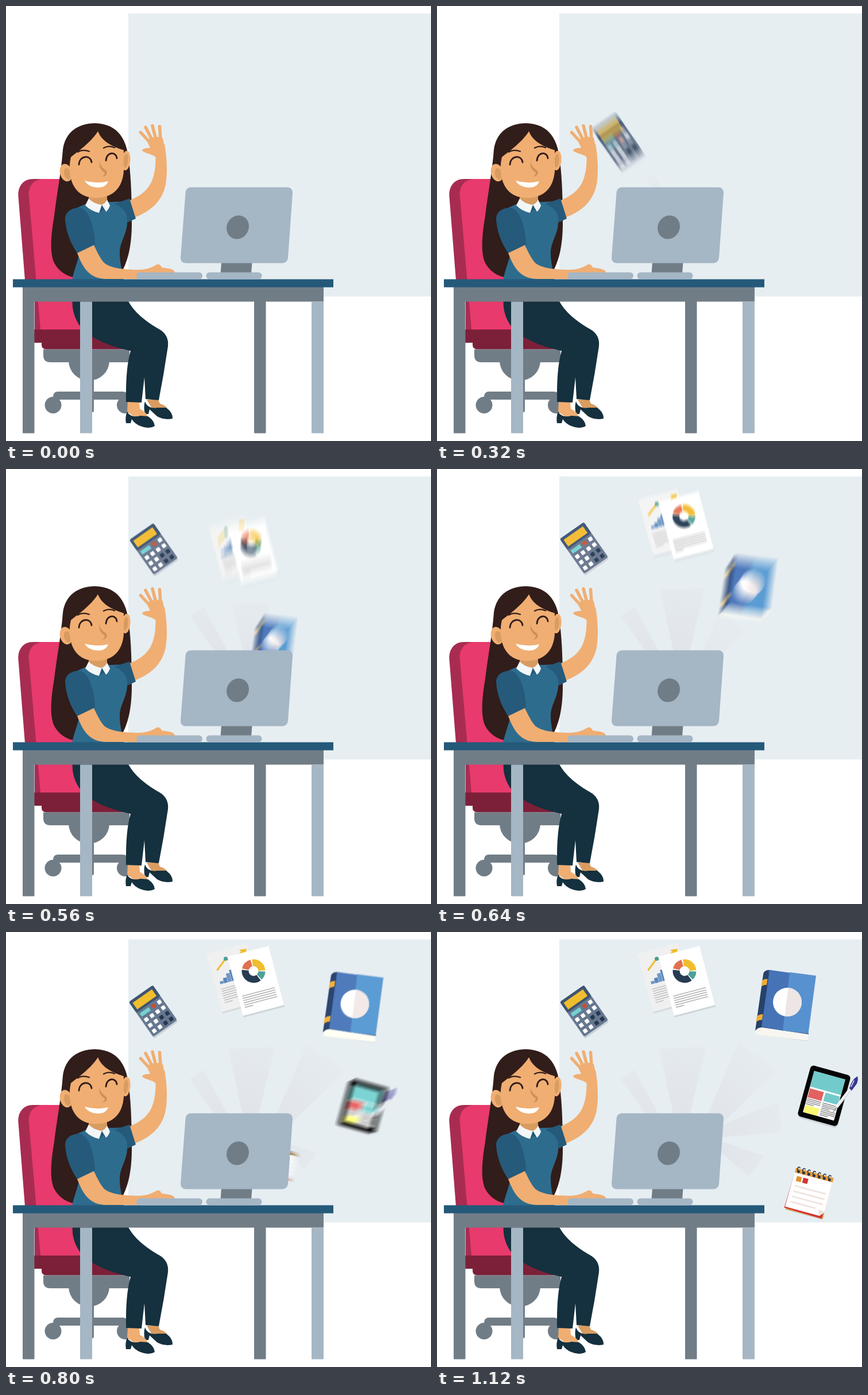
An HTML page with a canvas that plays this animation: 740 px wide and 757 px high, repeating every 1.96 s.

```html
<!DOCTYPE html>
<html>
<head>
<meta charset="utf-8">
<style>
html, body { margin: 0; overflow: hidden; background: #fff; }
canvas { display: block; }
</style>
</head>
<body>
<canvas id="stage" width="740" height="757"></canvas>
<script>
const W = 740, H = 757, LOOP = 1960, STEP = 40, SAMPLES = 11;
const ORIGIN = [402, 380], RAY_ORIGIN = [425, 366];
const SKIN = '#f0ae72', SHADE = '#d99c60', HAIR = '#311d1a', STEEL = '#717d86', SILVER = '#a5b6c5', NAVY = '#15303e';

function layer(w, h, draw) {
  const c = document.createElement('canvas');
  c.width = w; c.height = h;
  const g = c.getContext('2d');
  if (draw) draw(g);
  return c;
}
function fill(g, color, d) {
  g.fillStyle = color;
  g.fill(new Path2D(d));
}
function line(g, color, width, d) {
  g.strokeStyle = color;
  g.lineWidth = width;
  g.stroke(new Path2D(d));
}
function box(g, color, x, y, w, h, r = 0) {
  g.fillStyle = color;
  g.beginPath();
  g.roundRect(x, y, w, h, r);
  g.fill();
}
function disc(g, color, x, y, rx, ry = rx, turn = 0) {
  g.fillStyle = color;
  g.beginPath();
  g.ellipse(x, y, rx, ry, turn, 0, 7);
  g.fill();
}
function turned(g, x, y, deg, draw) {
  g.save();
  g.translate(x, y);
  g.rotate(deg * Math.PI / 180);
  draw();
  g.restore();
}

function drawChair(g) {
  fill(g, '#a82c52', 'M64 301H47C30 301 20 314 21.500 332L34 490L50 514V570H70V301Z');
  fill(g, '#e83a6c', 'M64 301C47 302 38 315 40 332L60 563H150V301Z');
  fill(g, '#7c2039', 'M49 563H217V597.500H70Q62 597 62 590V586H49Z');
  fill(g, STEEL, 'M65 597.500H215V620H77Q65 620 65 608Z');
  fill(g, STEEL, 'M109 617A35.500 35 0 0 0 180 617Z');
  box(g, STEEL, 135, 640, 18, 67, 3);
  fill(g, STEEL, 'M82 685V680Q82 671 91 671H203Q212 671 212 680V685Z');
  disc(g, STEEL, 82, 694.500, 14.500);
  disc(g, STEEL, 207.500, 694.500, 14.500);
}

function drawLegs(g) {
  fill(g, SHADE, 'M245 685H265L268 692Q281 696 280 702L255 702Z');
  fill(g, NAVY, 'M242 688C245 697 253 701 263 699L279 699Q291 708 290 718Q275 721 263 714L250 702L248 710H242Q239 697 242 688Z');
  fill(g, SKIN, 'M212 688H232L233 701Q246 708 246 714L225 716L211 706Z');
  fill(g, NAVY, 'M211 706C215 714 225 716 234 713L247 714Q258 721 259 731Q249 737 234 731Q224 727 219 719L217 726H209Q207 715 211 706Z');
  fill(g, NAVY, 'M116 510H211C222 533 245 550 266 562Q284 572 282 592Q275 640 266 686L243 684L241 646L236 690L209 689Q208 630 217 600C180 592 150 580 131 560C120 546 114 528 116 510Z');
}

function drawWoman(g) {
  fill(g, HAIR, 'M155 204C125 204 103 220 99 250C96 290 88 330 84 365C78 400 76 430 84 447C91 461 105 470 118 472L204 458C213 440 219 415 219 378C219 340 218 300 214 270C211 235 197 205 155 204Z');
  // raised arm
  fill(g, SKIN, 'M214 339C246 325 262 310 260.500 256L276 240C281 268 281 295 278 310C273 337 255 356 224 368Z');
  fill(g, SKIN, 'M245 234C252 227 268 226 273 230C275 240 277 248 276.500 262L261 264C258 258 245 258 237 252Q237 247 251 247Z');
  line(g, SKIN, 5.500, 'M251 238L234.500 220M255 234L243 211M261 232L255 208.500M269 232L267.500 209.500');
  // body
  fill(g, '#2e6c8e', 'M140 344L180 341L213 340L211 376C211 397 198 410 198 430C198 446 202 460 205 476H115C120 455 126 442 129 425L122 352Z');
  fill(g, '#255a7b', 'M189 344L215 335L226 370L211 377C212 362 208 354 189 344Z');
  fill(g, SHADE, 'M144 324H176V340L167 348L144 338Z');
  fill(g, '#f3f6f7', 'M144 335L138 347Q148 357 162 360L167 346Q152 344 144 335Z');
  fill(g, '#f3f6f7', 'M176 337L181 347Q179 354 174 358L166 346Q173 344 176 337Z');
  fill(g, '#1f5877', 'M167 346L163 360L169 354L174 358Z');
  // resting arm
  fill(g, SKIN, 'M123 427C133 455 145 475 175 475H232L294 464Q294 459 284 457L271 455Q267 446 259 452Q246 459 232 459C200 459 180 455 171 447C162 437 158 425 152 415Z');
  fill(g, '#255a7b', 'M129 351C111 351 103 360 103 371C105 400 117 419 124 430L155 415C155 393 148 371 142 362Q137 353 129 351Z');
  // head
  disc(g, SKIN, 104.500, 290, 10.500, 15.500, -.25);
  disc(g, SHADE, 107, 292, 6, 10, -.25);
  disc(g, SKIN, 209, 269, 7.500, 17, .1);
  disc(g, SHADE, 208.500, 269, 4, 12, .1);
  fill(g, SKIN, 'M160 218C147 239 121 256 113 263C107 288 111 333 156 334C194 334 207 307 205 275L205 251C188 245 168 238 160 218Z');
  line(g, HAIR, 2.300, 'M125 254Q133 249 145 253M170 247Q179 242 189 246.500');
  line(g, HAIR, 2.800, 'M127 276C128 259 148 259 149 272M174 269C175 253 192 253 193 265');
  fill(g, '#cd9055', 'M163 269C163 283 176 284 176 290Q175 296 167 297Q172 294 172 290C165 285 161 280 163 269Z');
  fill(g, '#fff', 'M137 304Q157 310 178 305Q174 316 160 316Q143 315 137 304Z');
}

function drawDesk(g) {
  box(g, STEEL, 29, 489, 524, 25.500);
  for (const x of [29, 432]) box(g, STEEL, x, 489, 20.500, 254.500, 1);
  for (const x of [129, 532]) box(g, SILVER, x, 514.500, 21, 229, 1);
  box(g, '#25597a', 12, 475.500, 558, 14);
  fill(g, STEEL, 'M375 446H428.500L427 466H373.500Z');
  box(g, SILVER, 227, 463.500, 115, 12, 6);
  box(g, SILVER, 348.500, 463.500, 97, 12, 6);
  fill(g, SILVER, 'M322 315.500H490Q499 316 499 325L491 438Q490 447 481 447.500H313Q304 447 304 438L312.500 325Q313 316 322 315.500Z');
  disc(g, STEEL, 403.500, 385, 19, 21, .5);
}

function drawCalculator(g) {
  turned(g, 257, 141, -35, () => box(g, '#c9d1d7', -25, -37, 51, 74, 3));
  turned(g, 256, 137.500, -35, () => {
    box(g, '#667890', -25.500, -37, 51, 74, 3);
    box(g, '#3e5570', -25.500, -37, 51, 23, 3);
    box(g, '#f0bd2d', -21, -32, 41, 14);
    box(g, '#72d2cf', -21.500, -10, 19, 7);
    for (let i = 2; i < 16; i++) {
      const col = i % 4, row = i >> 2;
      const color = i == 2 ? '#c9502f' : row > 1 && col > 1 ? '#26384f' : '#fff';
      box(g, color, -21.500 + col * 12, -10 + row * 12, 7, 7, 1);
    }
  });
}

function textLines(g, x, y, w, count, gap, color, thick = 1.300) {
  for (let i = 0; i < count; i++)
    box(g, color, x, y + i * gap, i == count - 1 ? w / 4 : w, thick);
}

function drawPapers(g) {
  turned(g, 399, 82, -15.500, () => box(g, '#d5dbdf', -37, -52, 74, 104));
  turned(g, 398, 79, -15.500, () => {
    box(g, '#f0f0f1', -37, -52, 74, 104);
    textLines(g, -28, 13, 56, 7, 4, '#b9b9bb');
    [5, 9, 15, 20].forEach((h, i) => box(g, i % 2 ? '#5a87bd' : '#7197c4', -27 + i * 7, 5 - h, 6.500, h));
  });
  line(g, '#f0bd2d', 3, 'M368 66L382 47L397 48L414 32');
  fill(g, '#f0bd2d', 'M406 31L419 29L416 41Z');
  disc(g, '#4a9e98', 382.500, 46.500, 3.500);
  turned(g, 436, 88, -14.700, () => box(g, '#cfd6da', -37, -53, 74, 106));
  turned(g, 435, 85, -14.700, () => {
    box(g, '#fff', -37, -53, 74, 106);
    textLines(g, -30, 19, 59, 6, 4, '#b4b4b6', 1.600);
  });
  g.lineCap = 'butt';
  g.lineWidth = 12;
  for (const [from, to, color] of [[-98, -4, '#f0bd2d'], [2, 46, '#4f9f98'], [52, 186, '#263c52'], [193, 255, '#e0704f']]) {
    g.strokeStyle = color;
    g.beginPath();
    g.arc(431, 68, 14.500, from * Math.PI / 180, to * Math.PI / 180);
    g.stroke();
  }
}

function drawBook(g) {
  fill(g, '#c9d1d7', 'M558 178L645 190V181L560 170Z');
  fill(g, '#f8f6f0', 'M556 165Q551 177 560 179L645 189L647 178L568 165Z');
  fill(g, '#26426b', 'M579 66Q569 66 568 74L554 172Q558 166 566 166L647 178V176L570 160Z');
  fill(g, '#4573b5', 'M579 66L615 71L604 172L565 165Z');
  fill(g, '#5891cf', 'M614 70L660 76L646.500 177L602 171.500Z');
  fill(g, '#f0ad35', 'M566 84.500Q570 81 575.500 82L574 92Q568 92 564.500 95Z');
  fill(g, '#f0ad35', 'M557 147Q561 143 567.500 143L566 153Q559 153 555.500 157Z');
  disc(g, '#fff', 610, 122, 25);
  g.fillStyle = '#ede6e5';
  g.beginPath();
  g.arc(610, 122, 25, -1.500, 1.760);
  g.fill();
}

function drawTablet(g) {
  turned(g, 674, 288, 15.500, () => box(g, '#cbd3d8', -35, -46, 71, 92, 6));
  turned(g, 674, 285, 15.500, () => {
    box(g, '#050505', -36, -46, 72, 92, 6);
    box(g, '#fff', -28, -37, 56, 74);
    box(g, '#72cacb', -28, -37, 56, 28);
    box(g, '#e26260', -27, -6, 25, 16);
    box(g, '#72cacb', 1, -6, 26, 15);
    box(g, '#f8f871', -27, 24, 25, 13);
    for (let i = 0; i < 4; i++) box(g, '#777', -27, 12 + i * 3, i == 3 ? 14 : 25, 1.200);
    for (let i = 0; i < 8; i++) box(g, '#777', 1, 12 + i * 3, i % 4 == 3 ? 15 : 26, 1.200);
  });
  line(g, '#999', 1.500, 'M696 305L690 313');
  line(g, '#dcdce8', 5.500, 'M697 303L720 273');
  line(g, '#f5f5fa', 3, 'M696 303L719 273');
  fill(g, '#383791', 'M732 251Q734 256 731 264L722 276L718 272Q722 257 732 251Z');
  line(g, '#eeeef6', 1.500, 'M721 269L726 259');
}

function drawNotepad(g) {
  turned(g, 647, 459, 15, () => box(g, '#cbd3d8', -33, -30, 67, 64));
  turned(g, 648, 456, 15, () => {
    box(g, '#e59a3c', -33, -34, 67, 70);
    fill(g, '#d13435', 'M-34 -25L-36 34L32 36V-25Z');
    fill(g, '#fff', 'M-34 -35H34V24L27 32H-35Z');
    fill(g, '#e5e1df', 'M34 23L26 32L23 22Z');
    box(g, '#e59a3c', -34, -38, 68, 8);
    for (let i = 0; i < 7; i++) {
      const x = -28 + i * 9.300;
      disc(g, '#26384f', x, -33, 2.500);
      line(g, '#26384f', 1.600, `M${x} -33C${x - 5} -36 ${x - 3} -43 ${x + 1} -40`);
    }
    box(g, '#e59133', -28.500, -25, 9, 9);
    box(g, '#d13435', -17, -25, 9, 9);
    for (let i = 0; i < 4; i++) box(g, '#efe5e1', -28, -9 + i * 9.500, i == 3 ? 45 : 56, 3);
  });
}

// Each item flies out with one ray: centre, start, duration, shrink at the origin
const items = [
  [drawCalculator, 256, 139, -47, 690, 0, 'M320 256L344 240L425 390H415Z'],
  [drawPapers, 417, 82, 206, 560, .5, 'M387 203L468 200L425 380Z'],
  [drawBook, 607, 127, 322, 560, .5, 'M525 193L592 240L449 380H444Z'],
  [drawTablet, 681, 285, 444, 560, .5, 'M570 390L542 425L430 328V341Z'],
  [drawNotepad, 648, 455, 567, 553, .5, 'M594 296L600 348L430 363Z']
].map(([draw, x, y, start, span, shrink, ray]) => ({
  x, y, start, span, shrink, ray: new Path2D(ray),
  art: layer(200, 200, g => {
    g.translate(100 - x, 100 - y);
    g.lineCap = g.lineJoin = 'round';
    draw(g);
  })
}));

const front = layer(W, H, g => {
  g.lineCap = g.lineJoin = 'round';
  drawChair(g);
  drawLegs(g);
  drawWoman(g);
  drawDesk(g);
});
const blur = layer(W, H), bg = blur.getContext('2d');
const ctx = document.getElementById('stage').getContext('2d');
const rayTint = ctx.createRadialGradient(...RAY_ORIGIN, 40, ...RAY_ORIGIN, 200);
rayTint.addColorStop(0, '#e1e4ea');
rayTint.addColorStop(1, '#e5ebef');

// Share of the way still to go: cubic ease in and out
function remaining(item, t) {
  const p = Math.min(1, Math.max(0, (t - item.start) / item.span));
  return p < .5 ? 1 - 4 * p ** 3 : 4 * (1 - p) ** 3;
}
function place(g, item, left) {
  const size = 200 * (1 - item.shrink * left);
  const x = item.x + (ORIGIN[0] - item.x) * left, y = item.y + (ORIGIN[1] - item.y) * left;
  g.drawImage(item.art, x - size / 2, y - size / 2, size, size);
}
function drawItem(item, t) {
  if (t >= item.start + item.span) return place(ctx, item, 0);
  // average several moments within half a step for motion blur
  bg.clearRect(0, 0, W, H);
  bg.globalCompositeOperation = 'lighter';
  bg.globalAlpha = 1 / SAMPLES;
  for (let i = 0; i < SAMPLES; i++)
    place(bg, item, remaining(item, t + (i / (SAMPLES - 1) - .5) * STEP / 2));
  ctx.drawImage(blur, 0, 0);
}
function drawRay(item, t) {
  const scale = 1 - remaining(item, t);
  ctx.save();
  ctx.globalAlpha = scale;
  ctx.translate(...RAY_ORIGIN);
  ctx.scale(scale, scale);
  ctx.translate(-RAY_ORIGIN[0], -RAY_ORIGIN[1]);
  ctx.fillStyle = rayTint;
  ctx.fill(item.ray);
  ctx.restore();
}

function frame() {
  const t = Math.floor(performance.now() % LOOP / STEP) * STEP;
  box(ctx, '#fff', 0, 0, W, H);
  box(ctx, '#e6eef2', 213, 13, 527, 492.500);
  if (t >= 80) {
    for (const item of items) drawRay(item, t);
    for (const item of items) if (t > item.start) drawItem(item, t);
  }
  ctx.drawImage(front, 0, 0);
  requestAnimationFrame(frame);
}
frame();
</script>
</body>
</html>
```
